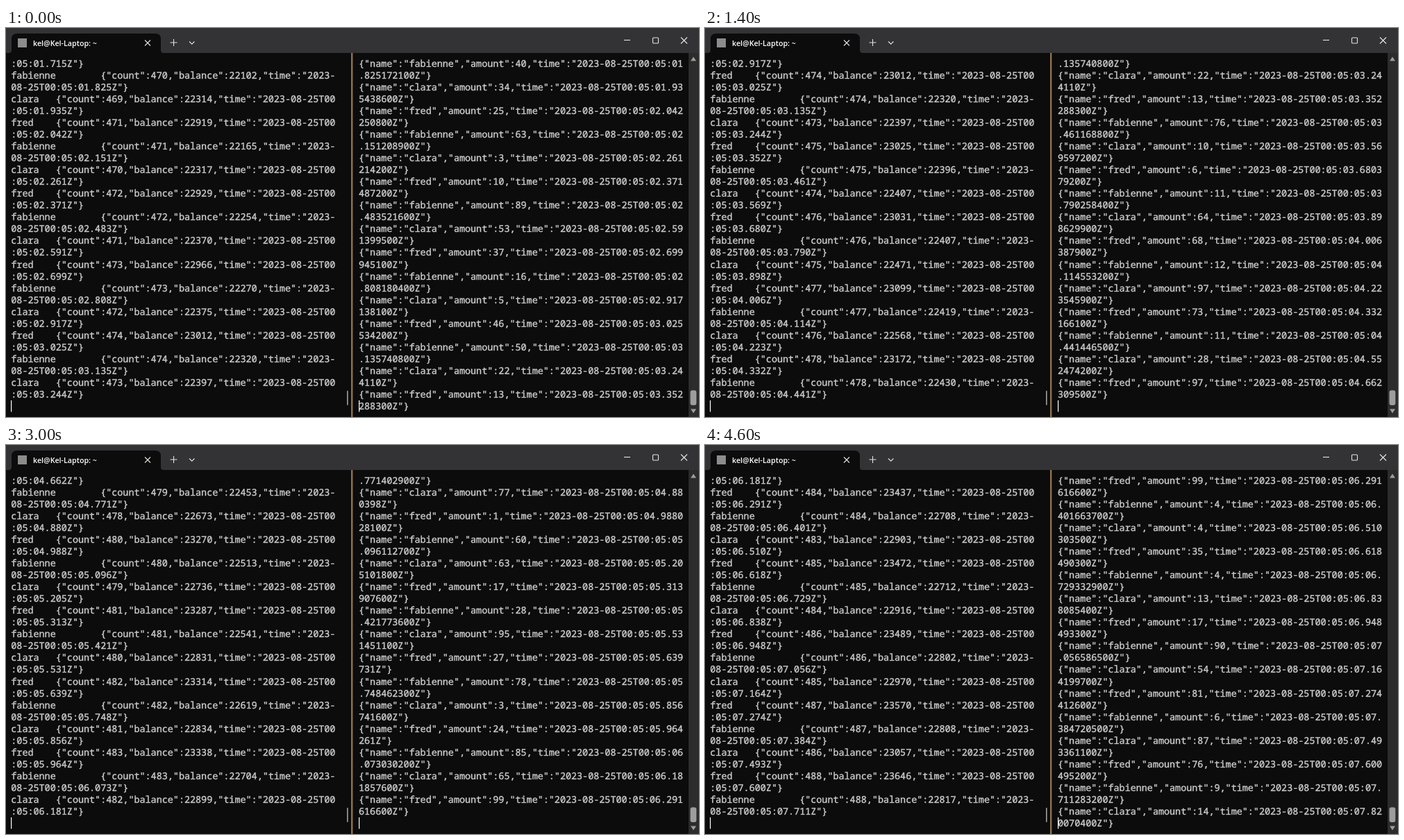
An HTML page for the animation above (4800 ms loop, 998 by 561 pixels).

```html
<!DOCTYPE html>
<html lang="en">
<head>
<meta charset="utf-8">
<title>Terminal</title>
<style>
  html, body { margin: 0; width: 100%; height: 100%; overflow: hidden; background: #0c0c0c; }
  svg { display: block; width: 100vw; height: 100vh; }
  .row {
    font: 500 13.43px "Noto Sans Mono", "DejaVu Sans Mono", monospace;
    font-variant-ligatures: none;
    fill: #ccc; stroke: #ccc; stroke-width: .4;
    white-space: pre; text-rendering: geometricPrecision;
  }
  .title { font: 600 10.7px "Open Sans", "Noto Sans", sans-serif; fill: #fff; }
  .glyph { fill: none; stroke: #e4e4e4; stroke-width: 1.1; }
  .cursor { fill: #fff; }
</style>
</head>
<body>
<svg id="stage" viewBox="0 0 998 561" xmlns="http://www.w3.org/2000/svg">
  <rect width="998" height="561" fill="#0c0c0c"/>
  <rect width="998" height="36" fill="#333335"/>
  <path d="M4 36q4 0 4-4V16q0-8 8-8H215q8 0 8 8v16q0 4 4 4z" fill="#0c0c0c"/>
  <rect x="17" y="15" width="13" height="13" fill="#8c8c8c"/>
  <text class="title" x="39" y="26">kel@Kel-Laptop: ~</text>
  <g class="glyph">
    <path d="M200 17.5l8 8m0-8l-8 8"/>
    <path d="M236.5 21h10m-5-5v10"/>
    <path d="M264 19.5l3.7 3.7 3.7-3.7"/>
    <path d="M890 17.5h9"/>
    <rect x="931.5" y="14" width="8" height="8" rx="1"/>
    <path d="M972 13.5l9 9m0-9l-9 9"/>
  </g>
  <rect x="497" y="36" width="2.4" height="525" fill="#8f7350"/>
  <rect x="491" y="523" width="1.6" height="21" rx=".8" fill="#a0a0a0"/>
  <rect x="983" y="36" width="15" height="525" fill="#2c2c2d"/>
  <path d="M986 47.5l4-6 4 6zM986 549.5h8l-4 6z" fill="#9d9d9d"/>
  <rect x="985.5" y="522.5" width="8.8" height="21.5" rx="3" fill="#9d9d9d"/>
  <g id="panes"></g>
</svg>
<script>
const COLUMNS = 58, ROWS = 30, ROW_HEIGHT = 17.03, FIRST_BASELINE = 56;
const STEP_MS = 200, LOOP_MS = 4800;

// amount@seconds, one payment after another
const payments = `0@01.715
40@01.825172100 34@01.935438600 25@02.042250800 63@02.151208900
3@02.261214200 10@02.371487200 89@02.483521600 53@02.591399500
37@02.699945100 16@02.808180400 5@02.917138100 46@03.025534200
50@03.135740800 22@03.244110 13@03.352288300 76@03.461168800
10@03.569597200 6@03.680379200 11@03.790258400 64@03.898629900
68@04.006387900 12@04.114553200 97@04.223545900 73@04.332166100
11@04.441446500 28@04.552474200 97@04.662309500 23@04.771402900
77@04.880398 1@04.988028100 60@05.096112700 63@05.205101800
17@05.313907600 28@05.421773600 95@05.531451100 27@05.639731
78@05.748462300 3@05.856741600 24@05.964261 85@06.073030200
65@06.181857600 99@06.291616600 4@06.401663700 4@06.510303500
35@06.618490300 4@06.729332900 13@06.838085400 17@06.948493300
90@07.056586500 54@07.164199700 81@07.274412600 6@07.384720500
87@07.493361100 76@07.600495200 9@07.711283200 14@07.820070400`.split(/\s+/);

// accounts take turns
const accounts = [
  { name: "fred", count: 469, balance: 22894 },
  { name: "fabienne", count: 469, balance: 22062 },
  { name: "clara", count: 468, balance: 22280 },
];

const wrap = text => [text.slice(0, COLUMNS), text.slice(COLUMNS)];
const stamp = seconds => `"time":"2023-08-25T00:05:${seconds}Z"}`;

const totals = [], inputs = [];
payments.forEach((payment, i) => {
  const [amount, seconds] = payment.split("@");
  const account = accounts[i % accounts.length];
  const { name } = account;
  account.count++;
  account.balance += Number(amount);
  const key = name.padEnd(name.length < 8 ? 8 : 16);
  totals.push(...wrap(`${key}{"count":${account.count},"balance":${account.balance},${stamp(seconds.slice(0, 6))}`));
  inputs.push(...wrap(`{"name":"${name}","amount":${amount},${stamp(seconds)}`));
});

// running number of printed payments for each step
function progress(start, increments) {
  const counts = [start];
  for (const digit of increments) counts.push(counts[counts.length - 1] + Number(digit));
  return counts;
}

function add(tag, attributes) {
  const node = document.createElementNS("http://www.w3.org/2000/svg", tag);
  for (const key in attributes) node.setAttribute(key, attributes[key]);
  return document.getElementById("panes").appendChild(node);
}

function makePane(x, lines, printed, unscrolled = []) {
  const rows = Array.from({ length: ROWS }, (_, i) =>
    add("text", { class: "row", x, y: FIRST_BASELINE + i * ROW_HEIGHT }));
  add("rect", { class: "cursor", x: Math.floor(x), y: 537, width: 1.2, height: 16.5 });
  return step => {
    const end = printed[step] * 2;
    const visible = unscrolled.includes(step) ? ROWS : ROWS - 1;
    rows.forEach((row, i) => {
      row.textContent = i < visible ? lines[end - visible + i] : "";
    });
  };
}

const panes = [
  makePane(7.3, totals, progress(15, "30321113321212221132122")),
  makePane(508, inputs, progress(16, "21222212222212222122122"), [0, 5, 11, 12, 17, 23]),
];

let shown = -1;
const started = performance.now();
function render() {
  const elapsed = Math.max(0, performance.now() - started) % LOOP_MS;
  const step = Math.floor(elapsed / STEP_MS);
  if (step !== shown) {
    panes.forEach(draw => draw(step));
    shown = step;
  }
  requestAnimationFrame(render);
}
render();
</script>
</body>
</html>
```
